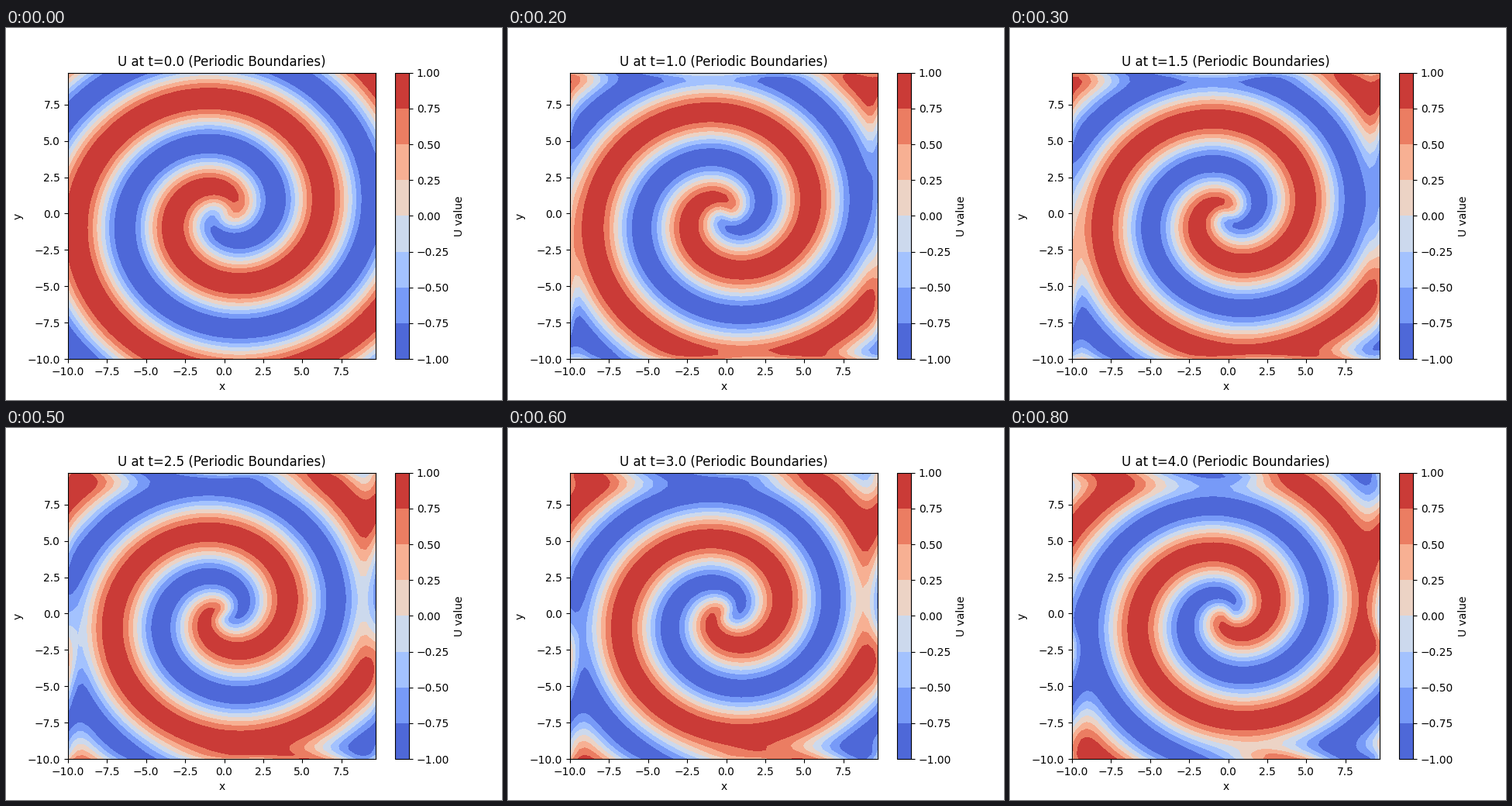
These frames come from a looping animation (640 by 480 pixels, 0.9 s). A matplotlib script:

```python
import numpy as np
import matplotlib.pyplot as plt
from matplotlib.animation import FuncAnimation

# Lambda-omega reaction-diffusion spiral on a periodic square
N, SIZE = 64, 20.0
DIFF, BETA = 0.1, 1.0
FRAMES, T_STEP, SUBSTEPS = 9, 0.5, 20
LEVELS = np.linspace(-1, 1, 9)

axis = np.linspace(-SIZE / 2, SIZE / 2, N, endpoint=False)
X, Y = np.meshgrid(axis, axis)
k = 2 * np.pi * np.fft.fftfreq(N, SIZE / N)
KX, KY = np.meshgrid(k, k)
K2 = KX**2 + KY**2


def rate(z):
    amp2 = np.abs(z)**2
    laplacian = np.fft.ifft2(-K2 * np.fft.fft2(z))
    return (1 - amp2 - 1j * BETA * amp2) * z + DIFF * laplacian


def rk4(z, dt):
    a = rate(z)
    b = rate(z + dt / 2 * a)
    c = rate(z + dt / 2 * b)
    d = rate(z + dt * c)
    return z + dt / 6 * (a + 2 * b + 2 * c + d)


def solve():
    r, angle = np.hypot(X, Y), np.arctan2(Y, X)
    z = np.tanh(r) * np.exp(1j * (angle - r))
    states = [z.real]
    for _ in range(FRAMES - 1):
        for _ in range(SUBSTEPS):
            z = rk4(z, T_STEP / SUBSTEPS)
        states.append(z.real)
    return np.clip(states, -1, 1)


U = solve()
fig, ax = plt.subplots(figsize=(6.4, 4.8), dpi=100)


def draw(i):
    ax.clear()
    filled = ax.contourf(X, Y, U[i], levels=LEVELS, cmap="coolwarm")
    ax.set_title(f"U at t={i * T_STEP:.1f} (Periodic Boundaries)")
    ax.set_xlabel("x")
    ax.set_ylabel("y")
    return filled


fig.colorbar(draw(0), ax=ax, label="U value")


def update(i):
    draw(i)
    return []


anim = FuncAnimation(fig, update, frames=FRAMES, interval=100,
                     init_func=lambda: update(0), repeat=True, repeat_delay=0)
plt.show()
```
